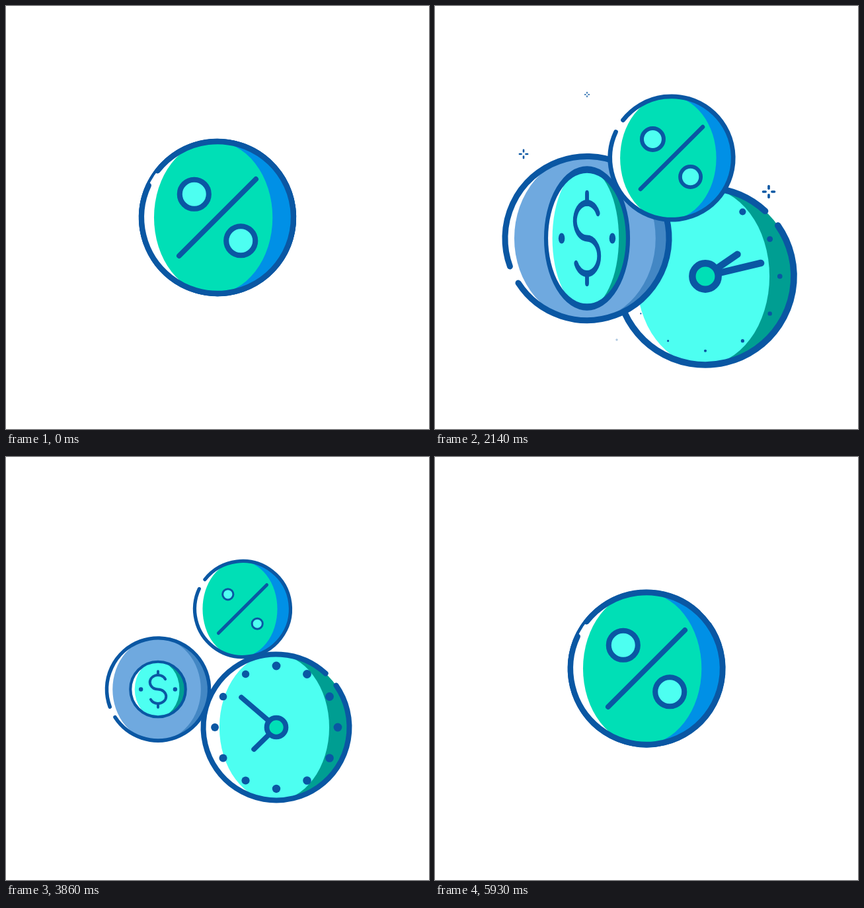
Animation, 640 px wide and 640 px high, one loop 6000 ms. Source, as an HTML page with a canvas:

```html
<!DOCTYPE html>
<html lang="en">
<head>
<meta charset="utf-8">
<title>Coins and clock</title>
<style>
  html, body { margin: 0; width: 100%; height: 100%; overflow: hidden; background: #fff; }
  canvas { display: block; width: 100vw; height: 100vh; }
</style>
</head>
<body>
<canvas id="stage" width="640" height="640"></canvas>
<script>
const ctx = document.getElementById('stage').getContext('2d');
const LOOP = 6000, RADIUS = 119, TAU = Math.PI * 2;
const INK = '#0a57a3', GREEN = '#00dfb6', BLUE = '#0090e6', CYAN = '#4dfff1',
      TEAL = '#009e92', SKY = '#6fa9df', STEEL = '#4387c4';
const RIM = 0.966, LINE = 0.07;

const rad = deg => deg * Math.PI / 180;
const ease = u => (1 - Math.cos(Math.PI * Math.min(1, Math.max(0, u)))) / 2;

// Eased value at time t from [time, value] pairs
function track(keys, t) {
  if (t <= keys[0][0]) return keys[0][1];
  for (let i = 1; i < keys.length; i++) {
    const [t0, a] = keys[i - 1], [t1, b] = keys[i];
    if (t < t1) return a + (b - a) * ease((t - t0) / (t1 - t0));
  }
  return keys[keys.length - 1][1];
}

const PULSE = [[0, 1], [765, 0.7], [1475, 1.2], [2220, 0.8], [2915, 1],
               [3725, 0.58], [4465, 1.2], [5205, 1]];
const INNER = [[530, 0.715], [1275, 0.58], [2020, 0.87], [2750, 0.58], [3300, 0.68],
               [4150, 0.5], [5000, 0.8], [5750, 0.715]];
const DOTS = [[880, 0.8], [1700, 0], [2440, 1.2], [3100, 0.8], [3840, 1.06],
              [4680, 0.57], [5400, 1.1], [6000, 1]];
const SQUEEZE = [[1560, 1], [2250, 0.57], [2860, 1]];
const TWINKLE = [[133, 0], [878, 1], [1623, 0], [2350, 0.5], [3050, 0]];
const SPARKS = [[505, 281], [134, 224], [230, 134], [275, 505]];

const pulse = t => track(PULSE, t);

function stroke(width) {
  ctx.strokeStyle = INK;
  ctx.lineWidth = width;
  ctx.stroke();
}

function line(x0, y0, x1, y1, width) {
  ctx.beginPath();
  ctx.moveTo(x0, y0);
  ctx.lineTo(x1, y1);
  stroke(width);
}

function disc(x, y, r, fill) {
  ctx.beginPath();
  ctx.arc(x, y, r, 0, TAU);
  ctx.fillStyle = fill;
  ctx.fill();
}

function at(x, y, sx, sy, draw) {
  ctx.save();
  ctx.translate(x, y);
  ctx.scale(sx, sy);
  draw();
  ctx.restore();
}

// White disc, shaded right side and a narrower bright face
function face(r, left, right, light, shade) {
  disc(0, 0, r, '#fff');
  ctx.save();
  ctx.clip();
  ctx.fillStyle = shade;
  ctx.fillRect(0, -1, 1, 2);
  ctx.beginPath();
  ctx.ellipse((left + right) / 2, 0, (right - left) / 2, 0.972, 0, 0, TAU);
  ctx.fillStyle = light;
  ctx.fill();
  ctx.restore();
}

function rim(gapStart, gapEnd) {
  ctx.beginPath();
  ctx.arc(0, 0, RIM, rad(gapEnd), rad(gapStart + 360));
  stroke(LINE);
}

function drawPercent(t) {
  face(RIM, -0.807, 0.7, GREEN, BLUE);
  rim(205, 218);
  line(-0.488, 0.488, 0.488, -0.488, 0.066);
  for (const [pos, lag] of [[-0.296, 200], [0.296, 130]]) {
    const s = pulse(t - lag);
    disc(pos, pos, 0.185 * s, CYAN);
    stroke(0.068 * s);
  }
}

function drawDollar(t) {
  face(RIM, -0.857, 0.808, SKY, STEEL);
  rim(147, 160);
  const s = track(INNER, t);
  at(0, 0, s * track(SQUEEZE, t), s, () => {
    face(0.952, -0.805, 0.74, CYAN, TEAL);
    ctx.beginPath();
    ctx.arc(0, 0, 0.952, 0, TAU);
    stroke(0.095);
    disc(-0.59, 0, 0.073, INK);
    disc(0.59, 0, 0.073, INK);
    ctx.beginPath();
    ctx.ellipse(0, -0.245, 0.28, 0.245, 0, rad(-25), rad(90), true);
    ctx.ellipse(0, 0.245, 0.28, 0.245, 0, rad(-90), rad(155));
    stroke(0.09);
    line(0, -0.62, 0, -0.49, 0.09);
    line(0, 0.49, 0, 0.62, 0.09);
  });
}

function drawClock(t) {
  face(RIM, -0.753, 0.7, CYAN, TEAL);
  rim(-47.5, -35);
  for (let i = 0; i < 12; i++) {
    const a = rad(i * 30);
    disc(0.813 * Math.sin(a), -0.813 * Math.cos(a), 0.053 * track(DOTS, t - i * 34), INK);
  }
  const s = pulse(t - 786 - 80);
  const long = 0.29 + 0.32 * pulse(t - 786 - 150);
  const turn = ease((t - 786) / (LOOP - 786));
  for (const [len, sweep] of [[long, 486], [long * 0.68, 353]]) {
    const a = rad(turn * sweep);
    line(0, 0, len * Math.sin(a), -len * Math.cos(a), 0.068 * s);
  }
  disc(0, 0, 0.128 * s, GREEN);
  stroke(0.068 * s);
}

// Back to front
const COINS = [
  { x: 409, y: 409, lag: 786, out: 790, back: 4830, draw: drawClock },
  { x: 230, y: 351.5, lag: 390, out: 393, back: 4418, draw: drawDollar },
  { x: 358, y: 230, lag: 0, out: 0, back: 4060, draw: drawPercent }
];
const TRAVEL = 1125;

function drawSpark(x, y, s) {
  if (s < 0.01) return;
  at(x, y, s, s, () => {
    for (const d of [-1, 1]) {
      line(0, 12 * d, 0, 21 * d, 9);
      line(12 * d, 0, 21 * d, 0, 9);
    }
  });
}

function render(t) {
  ctx.fillStyle = '#fff';
  ctx.fillRect(0, 0, 640, 640);
  ctx.lineCap = 'round';
  ctx.lineJoin = 'round';
  SPARKS.forEach(([x, y], i) => drawSpark(x, y, track(TWINKLE, t - i * 118)));
  for (const c of COINS) {
    const f = ease((t - c.out) / TRAVEL) - ease((t - c.back) / TRAVEL);
    const r = RADIUS * pulse(t - c.lag);
    at(320 + (c.x - 320) * f, 320 + (c.y - 320) * f, r, r, () => c.draw(t));
  }
}

const start = performance.now();
function tick() {
  render((performance.now() - start) % LOOP);
  requestAnimationFrame(tick);
}
tick();
</script>
</body>
</html>
```
